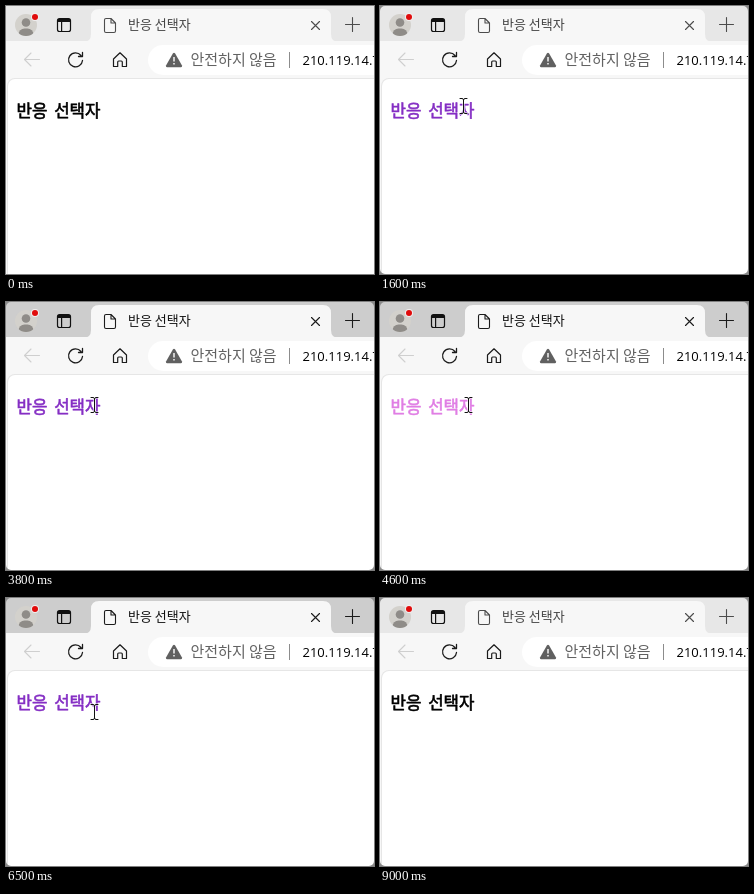
Write an HTML page with a canvas that moves like this. It is 368x268 px and loops after 9100 ms.

```html
<!DOCTYPE html>
<html lang="ko">
<head>
<meta charset="utf-8">
<title>반응 선택자</title>
<style>
  html, body { margin: 0; width: 100%; height: 100%; overflow: hidden; background: #fff; }
  canvas { display: block; }
</style>
</head>
<body>
<canvas id="stage" width="368" height="268"></canvas>
<script>
const ctx = document.getElementById('stage').getContext('2d');
const W = 368, H = 268, LOOP = 9100, STEP = 100;
const KR = '"Noto Sans CJK KR", "Noto Sans CJK", sans-serif';
const LATIN = '"Open Sans", "Noto Sans", sans-serif';
const TITLE = '반응 선택자';

// The pointer glides to each resting place, dipping downwards on the way
const ENTRY = { x: 392, y: 212 };
const TRIPS = [
  { start: 600, end: 1600, x: 83, y: 100, dip: 0 },
  { start: 2900, end: 3800, x: 88, y: 103, dip: 36 },
  { start: 5700, end: 6500, x: 88, y: 114, dip: 40 },
  { start: 6600, end: 7500, x: 86, y: 110, dip: 26 },
  { start: 7700, end: 8200, x: 350, y: 10, dip: 35 }
];
const BURSTS = [
  { start: 2200, count: 2 },
  { start: 4000, count: 5 },
  { start: 5400, count: 1 }
];
const CLICK_GAP = 300, FOCUS = 2200, BLUR = 9000;

function pointerAt(t) {
  if (t <= TRIPS[0].start || t > TRIPS.at(-1).end) return null;
  let { x, y } = ENTRY;
  for (const trip of TRIPS) {
    const p = Math.min(1, (t - trip.start) / (trip.end - trip.start));
    if (p <= 0) break;
    const sink = trip.dip * Math.min(1, 1.2 * Math.sin(Math.PI * p));
    x += (trip.x - x) * p;
    y += (trip.y - y) * p + sink;
  }
  return { x: Math.round(x), y: Math.round(y) };
}

function isPressed(t) {
  return BURSTS.some(({ start, count }) => {
    const since = t - start;
    return since >= 0 && since < count * CLICK_GAP && since % CLICK_GAP < STEP;
  });
}

function fillBox(x, y, w, h, r, color) {
  ctx.fillStyle = color;
  ctx.beginPath();
  ctx.roundRect(x, y, w, h, r);
  ctx.fill();
}

function disc(x, y, r, color) {
  ctx.fillStyle = color;
  ctx.beginPath();
  ctx.arc(x, y, r, 0, Math.PI * 2);
  ctx.fill();
}

function stroke(d, color, width = 1.2) {
  ctx.strokeStyle = color;
  ctx.lineWidth = width;
  ctx.lineCap = ctx.lineJoin = 'round';
  ctx.stroke(new Path2D(d));
}

function fill(d, color) {
  ctx.fillStyle = color;
  ctx.fill(new Path2D(d));
}

function text(str, x, y, font, color) {
  ctx.font = font;
  ctx.fillStyle = color;
  ctx.fillText(str, x, y);
}

function drawAvatar() {
  const tone = '#8f8c88';
  disc(20, 19, 11, '#d3d1cc');
  ctx.save();
  ctx.beginPath();
  ctx.arc(20, 19, 11, 0, Math.PI * 2);
  ctx.clip();
  disc(20, 16.5, 4.3, tone);
  fillBox(12.5, 22.5, 15, 12, [6, 6, 0, 0], tone);
  ctx.restore();
  disc(29, 11, 4, '#f0eeee');
  disc(29, 11, 3, '#e00b0b');
}

function drawTabStrip(active) {
  const ink = active ? '#1b1b1b' : '#4c4c4c';
  ctx.fillStyle = active ? '#cdcdcd' : '#e7e7e7';
  ctx.fillRect(0, 0, W, 36);
  drawAvatar();

  ctx.strokeStyle = '#111';
  ctx.lineWidth = 1.2;
  ctx.beginPath();
  ctx.roundRect(51.5, 12.5, 13, 13, 2);
  ctx.stroke();
  fill('M52 13H64V16H52ZM55 16H56.2V25H55Z', '#111');

  fill('M77 36Q85 36 85 28V11Q85 3 93 3H317Q325 3 325 11V28Q325 36 333 36Z', '#f7f7f7');
  stroke('M100 12.5H105L109.5 17V25Q109.5 26.5 108 26.5H100Q98.5 26.5 98.5 25V14Q98.5 12.5 100 12.5ZM105 12.5V17H109.5', ink, 1.1);
  text(TITLE, 122, 23, '13px ' + KR, active ? '#111' : '#444');
  stroke('M305.5 15.5L313.5 23.5M313.5 15.5L305.5 23.5', ink, 1.1);
  stroke('M339.5 18.5H353.5M346.5 11.5V25.5', ink, 1.1);
}

function drawToolbar() {
  ctx.fillStyle = '#f7f7f7';
  ctx.fillRect(0, 35, W, H - 35);
  stroke('M33.5 53.5H18.5M25 47L18.5 53.5L25 60', '#cfcfcf', 1.1);
  stroke('M75 49.5A7 7 0 1 0 76.5 54.5M76.5 46.5V50.5H72.5', '#1b1b1b', 1.3);
  stroke('M107.5 53L114 46.8L120.5 53V60.5H116.3V56Q116.3 55 115.3 55H112.7Q111.7 55 111.7 56V60.5H107.5Z', '#1b1b1b', 1.2);

  fillBox(142, 39, 260, 30, 15, '#fff');
  fill('M167 47.2Q168 46.2 169 47.2L176 59.5Q176.4 61 175 61.2H161Q159.6 61 160 59.5Z', '#606060');
  ctx.fillStyle = '#fff';
  ctx.fillRect(167.3, 51, 1.4, 4.5);
  ctx.fillRect(167.3, 57, 1.4, 1.5);
  text('안전하지 않음', 184.5, 59, '15px ' + KR, '#626262');
  ctx.fillStyle = '#8c8c8c';
  ctx.fillRect(283, 46, 1, 16);
  text('210.119.14.7', 296.5, 59, '13px ' + LATIN, '#000');
}

function drawPage(color) {
  fillBox(1, 72, W + 20, H, [8, 0, 0, 0], '#e6e6e6');
  fillBox(2, 73, W + 20, H, [7, 0, 0, 0], '#fff');

  // Regular weight with a thin outline gives a light bold
  ctx.wordSpacing = '3px';
  text(TITLE, 10.5, 111, '16.8px ' + KR, color);
  ctx.strokeStyle = color;
  ctx.lineWidth = 0.6;
  ctx.strokeText(TITLE, 10.5, 111);
  ctx.wordSpacing = '0px';
}

// Rounded outline around the window, fading in at the start
function drawFrame(t) {
  ctx.globalAlpha = Math.min(1, t / 400);
  ctx.fillStyle = '#8a8a8a';
  ctx.beginPath();
  ctx.rect(0, 0, W, H);
  ctx.roundRect(0, 0, W, H, 5);
  ctx.fill('evenodd');
  ctx.globalAlpha = 1;
}

function drawBeam({ x, y }) {
  const d = 'M-3 -7.5H-1Q.5 -7.5 .5 -6V6Q.5 7.5 -1 7.5H-3M4 -7.5H2Q.5 -7.5 .5 -6M.5 6Q.5 7.5 2 7.5H4';
  ctx.save();
  ctx.translate(x, y);
  stroke(d, 'rgba(255,255,255,.7)', 2.6);
  stroke(d, '#111', 1);
  ctx.restore();
}

function drawArrow({ x, y }) {
  const d = 'M.5 .5V16.5L4.3 13L6.8 18.5L9.2 17.4L6.8 12H11.8Z';
  ctx.save();
  ctx.translate(x, y);
  fill(d, '#fff');
  stroke(d, '#111', 1);
  ctx.restore();
}

function draw(t) {
  const active = t >= FOCUS && t < BLUR;
  const mouse = pointerAt(t);
  const hover = mouse && mouse.y >= 92 && mouse.y <= 118;

  drawTabStrip(active);
  drawToolbar();
  drawPage(isPressed(t) ? '#e07ee4' : hover ? '#852fc4' : '#000');
  drawFrame(t);
  if (mouse) (hover && mouse.x < 97 ? drawBeam : drawArrow)(mouse);
}

function tick() {
  const t = performance.now() % LOOP;
  draw(Math.floor(t / STEP) * STEP);
  requestAnimationFrame(tick);
}
tick();
</script>
</body>
</html>
```
